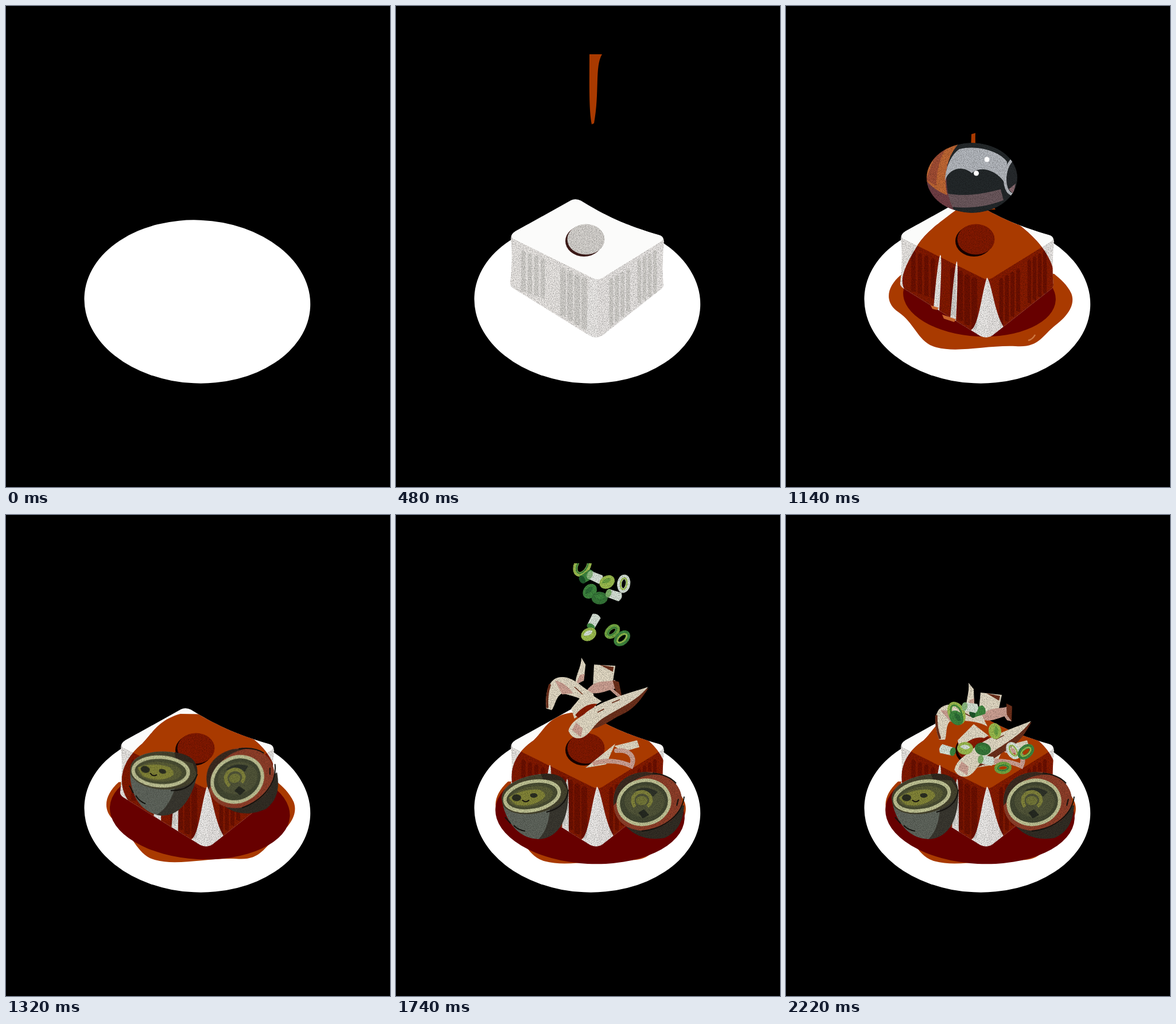
Animation, 669 px wide and 837 px high, one loop 2280 ms. Source, as an HTML page:

```html
<!DOCTYPE html>
<html lang="en">
<head>
<meta charset="utf-8">
<title>Tofu plate</title>
<style>
html, body { margin: 0; width: 100%; height: 100%; overflow: hidden; background: #000; }
svg { display: block; width: 100vw; height: 100vh; }
</style>
</head>
<body>
<svg viewBox="0 0 669 837">
  <defs>
    <filter id="grain" x="-5%" y="-5%" width="110%" height="110%" color-interpolation-filters="sRGB">
      <feTurbulence type="fractalNoise" baseFrequency=".75" numOctaves="2" seed="4"/>
      <feColorMatrix values="0 0 0 0 0  0 0 0 0 0  0 0 0 0 0  .9 0 0 0 -.37"/>
      <feComposite in2="SourceAlpha" operator="in" result="n"/>
      <feMerge><feMergeNode in="SourceGraphic"/><feMergeNode in="n"/></feMerge>
    </filter>
    <clipPath id="stage"><rect y="84" width="669" height="753"/></clipPath>
    <clipPath id="body"><path d="M305 338Q313 334 323 339C360 362 400 382 460 399Q467 402 467 410C464 440 464 465 466 486Q465 491 460 494L360 573Q349 580 338 574L204 491Q198 487 199 481C202 455 203 430 200 405Q200 397 208 392Z"/></clipPath>
    <clipPath id="coat"><path id="coatPath"/></clipPath>
    <clipPath id="shell"><ellipse rx="79" ry="61"/></clipPath>
    <clipPath id="cupL"><path id="cupShape" d="M184 494C182 470 222 451 262 450C290 450 302 464 300 490C299 532 282 562 250 564C214 565 189 532 184 494Z"/></clipPath>
  </defs>
  <g clip-path="url(#stage)">
    <ellipse cx="333.3" cy="514.5" rx="197" ry="142" transform="rotate(2.6 333.3 514.5)" fill="#fff"/>
    <g id="puddle">
      <path id="pool" fill="#a93a00" d="M200 468C174 490 172 516 195 532C225 552 230 586 262 594C300 604 350 590 400 592C440 595 445 575 470 555C490 540 505 520 497 500C490 485 478 475 467 466Z"/>
      <ellipse id="deep" fill="#670000"/>
    </g>
    <g id="tofu"></g>
    <g id="sauced" clip-path="url(#coat)"></g>
    <g id="drops" fill="#c7652c">
      <path d="M252 521L266 525L263 529L255 527ZM272 537L296 545L293 550L275 544Z"/>
      <path d="M422 582Q430 580 434 572" fill="none" stroke="#cf7a42" stroke-width="2.5"/>
    </g>
    <path id="stream" fill="#a93a00"/>
    <path id="shine" d="M338 115C339 215 340 315 382 384" fill="none" stroke="#cd6a30" stroke-width="4"/>
    <g id="egg"><g clip-path="url(#shell)" filter="url(#grain)">
      <ellipse rx="79" ry="61" fill="#24292b"/>
      <path d="M-82 12C-50 32 -10 36 50 20L55 39C10 56 -30 55 -82 42Z" fill="#6e5a5f"/>
      <path d="M-82 -30L-20 -65C-50 -40 -52 25 -28 62L-82 62Z" fill="#744047"/>
      <path d="M-80 -15L-50 -55L-18 -65C-46 -38 -50 0 -43 30Q-62 24 -80 5Z" fill="#c56a35"/>
      <path d="M-70 -24Q-60 -50 -44 -54Q-62 -24 -62 14L-80 4Z" fill="#a64f35"/>
      <path d="M-47 5C-46 -22 -34 -42 -22 -50C10 -58 48 -46 61 -28L59 12C42 -18 10 -20 0 -8C-15 -22 -40 -18 -47 5Z" fill="#b8bcc2"/>
      <ellipse cx="75" cy="-3" rx="17" ry="32" transform="rotate(8 75 -3)" fill="#272b2e" stroke="#b8bcc2" stroke-width="5"/>
      <path d="M64 20L76 10L72 28Z" fill="#8f7076"/>
    </g>
      <g fill="#fff"><circle cx="26" cy="-32" r="4.5"/><circle cx="7.500" cy="-8" r="4.500"/></g>
    </g>
    <g id="left"><g clip-path="url(#cupL)" filter="url(#grain)">
      <use href="#cupShape" fill="#62685f"/>
      <path d="M268 512C266 540 258 555 246 566L310 566V470Z" fill="#3b3931"/>
      <ellipse cx="242" cy="486" rx="60" ry="33" transform="rotate(-12 242 486)" fill="#48452f"/>
      <path d="M252 449L304 448V486L288 462L256 460Z" fill="#33291f"/>
      <ellipse cx="237" cy="489" rx="48" ry="25" transform="rotate(-11 237 489)" fill="#4c5034" stroke="#c5c898" stroke-width="6"/>
      <ellipse cx="235" cy="490" rx="39" ry="17" transform="rotate(-11 235 490)" fill="#5d6038"/>
      <path d="M196 492Q220 476 250 478Q266 486 256 494Q236 510 208 504Z" fill="#868839"/>
      <g fill="#2d3022"><ellipse cx="210" cy="492" rx="8" ry="6"/><ellipse cx="240" cy="488" rx="6.500" ry="4"/></g>
    </g>
      <path d="M220 496Q226 502 232 496M190 526L200 537M205 540Q212 548 225 550M300 478C298 500 284 512 262 517" fill="none" stroke="#14120e" stroke-width="2"/>
    </g>
    <g id="right"><g filter="url(#grain)">
      <path d="M392 530C410 560 440 567 468 562C490 552 500 535 502 505L440 520Z" fill="#332e25"/>
      <path d="M379 505C376 470 400 448 436 447C474 446 500 470 498 500C494 530 460 550 425 549C398 546 381 530 379 505Z" fill="#93402a"/>
      <path d="M379 505C376 470 400 448 436 447L462 452C430 450 402 462 392 492Z" fill="#3d2b20"/>
      <ellipse cx="432" cy="500" rx="45" ry="38" transform="rotate(-12 432 500)" fill="#454a33" stroke="#c5c898" stroke-width="6"/>
      <ellipse cx="433" cy="498" rx="35" ry="28" fill="#53573a"/>
      <path d="M415 480Q434 468 456 482L448 490Q432 478 415 480Z" fill="#30352a"/>
      <path d="M416 508C406 490 420 480 432 482C446 486 448 500 438 507" fill="none" stroke="#85873d" stroke-width="6"/>
      <ellipse cx="428" cy="497" rx="10" ry="8" fill="#767a3a"/>
      <path d="M422 518L432 512L441 522L430 528Z" fill="#272b22"/>
    </g>
      <path d="M502 490C498 524 466 546 428 550M447 449Q475 452 488 467M492 494L489 506" fill="none" stroke="#14120e" stroke-width="2"/>
    </g>
    <g id="toppings" filter="url(#grain)"></g>
  </g>
</svg>
<script>
const $ = id => document.getElementById(id);
const FRAME = 60, COUNT = 38;
const CREAM = '#e8dfc9', PINK = '#d3a597', BROWN = '#70311c';
const GREEN = '#3f8a40', LIME = '#9fc150', PALE = '#dce8dc';

const lerp = (a, b, u) => a.map((v, i) => v + (b[i] - v) * u);
const path = (d, fill) => `<path d="${d}" fill="${fill}"/>`;
const line = (d, color, w) => `<path d="${d}" fill="none" stroke="${color}" stroke-width="${w}" stroke-linecap="round"/>`;
const show = (id, on) => $(id).style.display = on ? '' : 'none';

// Value at step k between [step, numbers] stops, held outside them
function key(k, stops) {
  if (k <= stops[0][0]) return stops[0][1];
  for (let i = 1; i < stops.length; i++) {
    const [a, from] = stops[i - 1], [b, to] = stops[i];
    if (k <= b) return lerp(from, to, (k - a) / (b - a));
  }
  return stops[stops.length - 1][1];
}

// Puts numbers into a path template, one per #
const fill = (tpl, nums) => { let i = 0; return tpl.replace(/#/g, () => nums[i++].toFixed(1) + ' '); };

function tofu(c) {
  const groove = (x, top, bottom, w) => `M${x - w} ${bottom}L${x - w} ${top + 4}Q${x} ${top - 4} ${x + w} ${top + 4}L${x + w} ${bottom + 2}Z`;
  let grooves = '';
  for (let i = 0; i < 4; i++) {
    grooves += groove(222 + i * 11.3, 425 + i * 4.3, 496 + i * 4, 3.7)
      + groove(291 + i * 12.3, 455 + i * 5.7, 539 + i * 7.4, 5)
      + groove(375 + i * 9.8, 473 - i * 5.5, 556 - i * 8.4, 3.4)
      + groove(424 + i * 9, 441 - i * 5.5, 516 - i * 5.5, 3.2);
  }
  return `<g clip-path="url(#body)"><g filter="url(#grain)">
    ${path('M190 380H351V590H190Z', c.left)}${path('M351 380H480V590H351Z', c.right)}
    ${path('M338 470H351V582H330Z', c.edge)}${path(grooves, c.groove)}</g>
    ${path('M305 330H323V339C360 362 400 382 460 399Q468 403 463 409L358 474Q350 478 342 473L204 405Q197 398 208 388Z', c.top)}
    <ellipse cx="327.500" cy="409" rx="32.500" ry="27" fill="${c.shade}"/>
    <ellipse cx="331" cy="406" rx="32.500" ry="26.500" fill="${c.disc}" filter="url(#grain)"/></g>`;
}
$('tofu').innerHTML = tofu({ left: '#eeebe8', right: '#edeae8', edge: '#f2f0ee', groove: '#d6d4d0', top: '#fbfbfa', shade: '#3a1917', disc: '#dbd8d4' });
$('sauced').innerHTML = tofu({ left: '#861900', right: '#8a1b00', edge: '#861900', groove: '#701000', top: '#a93a00', shade: '#160000', disc: '#851900' });

const COAT = 'M##C######C######C######L##C######C######C######C######Z';
const coatFull = [302,343, 285,352,225,375,206,398, 203,425,225,470,255,502, 262,405,274,415,269,510, 283,514,
  290,420,304,420,298,517, 322,516,340,500,352,472, 365,495,400,500,432,480, 465,462,468,420,365,362];
coatFull.splice(-6, 6, 472,450, 478,396, 365,362);
const coatRun = [300,352, 270,375,245,392,230,415, 190,480,190,500,257,526, 268,400,275,402,267,530, 286,545,
  297,410,303,410,296,550, 335,600,335,520,350,472, 365,490,365,620,440,560, 510,460,440,400,365,352];
const coatRest = [305,344, 265,350,258,375,240,392, 175,435,200,510,257,530, 267,402,272,402,271,535, 289,545,
  297,430,302,430,301,550, 335,600,335,520,350,472, 365,490,365,620,440,560, 520,430,445,380,350,345];
const coatStart = coatFull.map((v, i) => i % 2 ? 372 + (v - 372) * .15 : 333 + (v - 333) * .15);

const STREAM = 'M##L##C######L##C######Z';
const thin = [337,84, 359,84, 346,105,355,150,345,204, 341,206, 336,180,337,140,337,84];
const full = [325,84, 362,84, 374,190,348,290,362,361, 302,343, 328,290,324,180,325,84];
const tail = [323,223, 330,221, 328,260,340,320,365,354, 297,358, 318,310,322,260,323,223];
const tip = thin.map((v, i) => i % 2 ? 84 + (v - 84) * .3 : v);

// Meat and mushroom: airborne pose at step 26, landing step, resting pose
const slices = [
  { air: [325,142,35], land: 30, rest: [320,317,0], art:
    path('M-2 -25L7 -14L8 14L-5 23C-8 5 0 -5 -2 -25Z', CREAM) + path('M0 5L8 2L8 14L-5 23Z', PINK) },
  { air: [383,130,-12], land: 30, rest: [355,328,0], art:
    path('M-16 -19L21 -15L14 18L-20 20Z', CREAM) + path('M-6 -18L18 -13L16 -5Z', BROWN) },
  { air: [348,158,10], land: 30, rest: [368,345,0], art:
    path('M-30 8C-15 -14 5 -6 18 -12L24 2C4 6 -10 18 -30 10Z', PINK) },
  { air: [377,178,-55], land: 30, rest: [388,345,0], art:
    path('M-4 -17L6 -12L5 14L-3 12Z', BROWN) + path('M-3 12L-14 -4L-8 -4L5 14Z', PINK) },
  { air: [307,178,62], land: 30, rest: [297,358,0], art:
    path('M-30 33C-42 0 -38 -25 -14 -28C5 -31 22 -18 42 -14L54 10C34 -2 5 0 -10 0C-20 8 -16 24 -20 33Z', CREAM)
    + line('M-35 -8C-36 10 -32 22 -29 30', BROWN, 4) + path('M-28 -18Q-10 -20 8 -5L-10 2Z', PINK) + line('M8 -16L24 -8', BROWN, 1.5) },
  { air: [348,158,-20], land: 30, rest: [325,388,0], art:
    path('M-26 4L2 -24L28 -4L-22 22Z', CREAM) + path('M-20 16Q0 -4 20 0L-12 24Z', '#8f1d00') },
  { air: [363,285,-14], land: 28, rest: [380,418,0], art:
    path('M0 -16L40 -26L44 -14L16 -6Z', CREAM) + path('M-50 22L2 -20L-14 16Z', CREAM)
    + line('M-34 14C-10 6 15 12 30 19C38 2 26 -10 4 -8', PINK, 8) },
  { air: [400,148,-16], land: 30, rest: [362,402,-31], art:
    path('M-60 8C-40 26 -5 16 20 18C45 18 65 5 78 -2L0 -6Z', BROWN)
    + path('M-80 0C-66 -14 -50 -10 -38 -14C0 -20 40 -10 78 -4C50 8 20 6 -10 8C-35 8 -45 22 -62 22C-72 22 -82 14 -80 0Z', CREAM)
    + path('M-74 2L-62 -6L-56 8L-66 20Z', PINK) + line('M-20 -5L-8 -5M10 -8L24 -7', BROWN, 1.5) },
];

const ring = (r, a, b) => `<ellipse rx="${r}" ry="${r * .62}" fill="none" stroke="${a}" stroke-width="8"/>`
  + `<ellipse rx="${r - 2}" ry="${r * .62 - 2}" fill="none" stroke="${b}" stroke-width="2.5"/>`;
const tube = (a, b) => path('M-12 -7L10 -8Q16 0 10 8L-12 7Z', a) + `<ellipse cx="-11" rx="5" ry="7.500" fill="${b}"/>`;
const chip = (a, b) => `<ellipse rx="14" ry="11" fill="${a}"/>` + path('M-9 -3Q0 -10 9 -2Q2 6 -9 -3Z', b);

// Scallions: shape, pose at step 33, pose at step 37
const scallions = [
  [ring(17, LIME, GREEN), [315,243,-10], [297,345,65]],
  [tube(GREEN, '#1f5a2c'), [324,262,20], [335,342,-20]],
  [tube(PALE, '#8fbf83'), [338,264,75], [322,335,10]],
  [chip(LIME, '#6fa743'), [358,272,20], [364,376,80]],
  [ring(12, PALE, LIME), [387,275,-30], [396,410,60]],
  [chip(GREEN, '#2d6f37'), [328,288,0], [297,353,50]],
  [chip('#37793a', GREEN), [345,300,50], [343,407,10]],
  [tube(PALE, '#7fb56c'), [371,295,70], [350,427,10]],
  [tube(PALE, GREEN), [335,340,-10], [280,409,195]],
  [chip(LIME, PALE), [326,363,20], [312,406,0]],
  [ring(11, '#77ad45', GREEN), [367,358,10], [378,440,-5]],
  [ring(12, GREEN, LIME), [384,370,10], [418,412,-40]],
];

$('toppings').innerHTML = [...slices.map(s => s.art), ...scallions.map(s => s[0])].map(a => `<g>${a}</g>`).join('');
const bits = [...$('toppings').children];
const place = (el, [x, y, r]) => el.setAttribute('transform', `translate(${x} ${y}) rotate(${r})`);

function draw(k) {
  show('tofu', k > 0);
  $('tofu').setAttribute('transform', `translate(0 ${Math.min(0, k - 5) * 99})`);

  show('sauced', k >= 10);
  $('coatPath').setAttribute('d', fill(COAT, key(k, [[10, coatStart], [15, coatFull], [19, coatRun], [23, coatRest]])));

  show('stream', k >= 7 && k < 20);
  $('stream').setAttribute('d', fill(STREAM, key(k, [[7, tip], [8, thin], [11, full], [16, full], [19, tail]])));
  show('shine', k >= 12 && k < 17);
  show('drops', k >= 18 && k < 21);

  show('puddle', k >= 16);
  const [sx, sy] = key(k, [[16, [.75, .72]], [19, [1, 1]], [23, [1.035, 1.1]]]);
  $('pool').setAttribute('transform', `translate(338 510) scale(${sx} ${sy}) translate(-338 -510)`);
  const [cx, cy, rx, ry] = key(k, [[16, [337,500,95,48]], [19, [337,505,133,70]], [23, [338,520,165,87]]]);
  Object.entries({ cx, cy, rx, ry, transform: `rotate(3 ${cx} ${cy})` }).forEach(([n, v]) => $('deep').setAttribute(n, v));

  show('egg', k >= 17 && k < 21);
  place($('egg'), key(k, [[17, [324,60,-24]], [19, [324,299,0]], [20, [326,345,6]]]));
  const [out, up, turn] = key(k, [[21, [70,-105,35]], [22, [28,-42,14]], [23, [0,0,0]]]);
  show('left', k >= 21);
  show('right', k >= 21);
  $('left').setAttribute('transform', `translate(${out} ${up}) rotate(${turn} 242 507)`);
  $('right').setAttribute('transform', `translate(${-out} ${up}) rotate(${-turn} 440 505)`);

  show('toppings', k >= 22);
  slices.forEach((s, i) => place(bits[i], lerp(s.air, s.rest, Math.min(1, (k - 26) / (s.land - 26)))));
  scallions.forEach(([, mid, rest], i) => {
    const high = [mid[0] + 17, mid[1] - 272, mid[2] - 90];
    place(bits[slices.length + i], k < 33 ? lerp(high, mid, (k - 26) / 7) : lerp(mid, rest, (k - 33) / 4));
  });
}

const start = performance.now();
let last = -1;
function tick(now) {
  const k = Math.floor(Math.max(0, now - start) / FRAME) % COUNT;
  if (k !== last) draw(last = k);
  requestAnimationFrame(tick);
}
draw(0);
requestAnimationFrame(tick);
</script>
</body>
</html>
```
